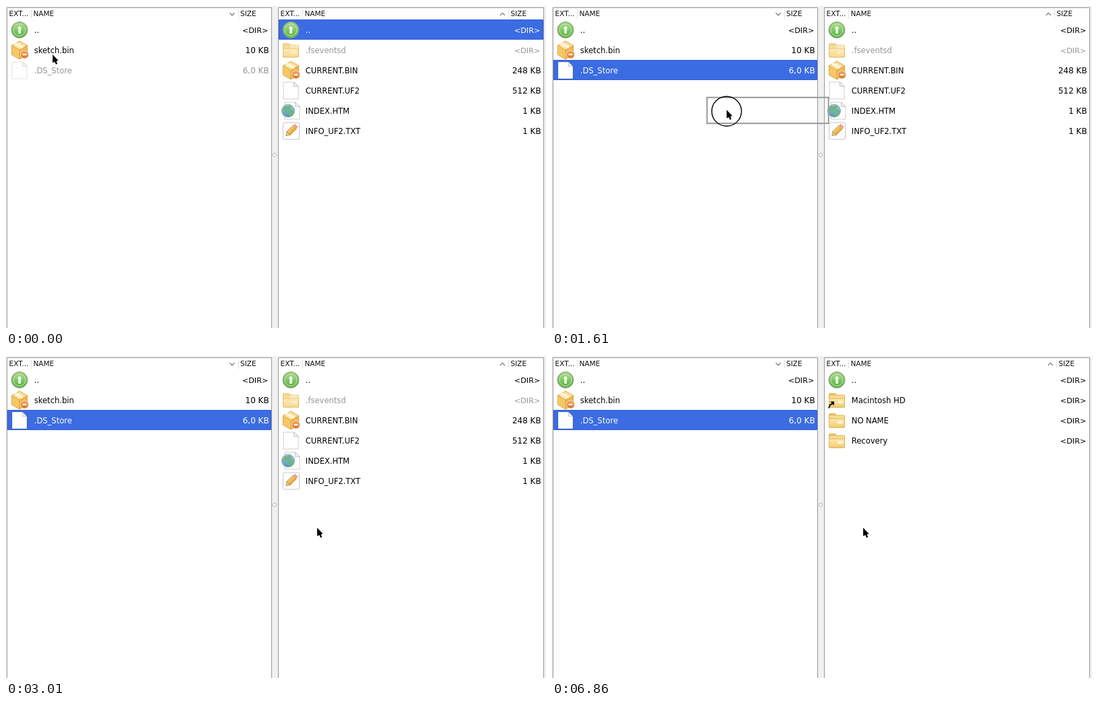
Animation, 800 px wide and 478 px high, one loop 7140 ms. Source, as an HTML page with a canvas:

```html
<!DOCTYPE html>
<html lang="de">
<head>
<meta charset="utf-8">
<title>Kopiere Dateien</title>
<style>
html, body { margin: 0; width: 100%; height: 100%; overflow: hidden; background: #f0f0f0; }
canvas { display: block; }
</style>
</head>
<body>
<canvas id="stage" width="800" height="478"></canvas>
<script>
const c = document.getElementById('stage').getContext('2d');
const LOOP = 7140, ROW = 30, HEAD = 20;
const PRESS = 280, DRAG = 1190, RELEASE = 1960, OPEN = 2400, CLOSE = 2800, COPIED = 3360, EJECTED = 6090;

const UP = ['up', '..', '<DIR>'];
const SKETCH = ['crate', 'sketch.bin', '10 KB'];
const FILES = [
  ['crate', 'CURRENT.BIN', '248 KB'], ['page', 'CURRENT.UF2', '512 KB'],
  ['web', 'INDEX.HTM', '1 KB'], ['note', 'INFO_UF2.TXT', '1 KB']
];
const LEFT = [UP, SKETCH, ['page', '.DS_Store', '6,0 KB', true]];
const BEFORE = [UP, ['folder', '.fseventsd', '<DIR>', true], ...FILES];
const AFTER = [UP, ...FILES, SKETCH];
const VOLUMES = [
  UP, ['link', 'Macintosh HD', '<DIR>'], ['folder', 'NO NAME', '<DIR>'], ['folder', 'Recovery', '<DIR>']
];

// Pointer stops: time, x, y.
const STOPS = [[70, 69, 72], [PRESS, 69, 64], [DRAG, 69, 64], [2030, 447, 244], [2310, 461, 255]];

const progress = (t, from, to) => Math.min(1, Math.max(0, (t - from) / (to - from)));
const smooth = p => p * p * (3 - 2 * p);
const mix = (a, b, p) => a + (b - a) * p;

function paint(fill, stroke, width = 1) {
  if (fill) { c.fillStyle = fill; c.fill(); }
  if (stroke) { c.strokeStyle = stroke; c.lineWidth = width; c.stroke(); }
}
function box(x, y, w, h, fill, stroke, radius = 0) {
  c.beginPath(); c.roundRect(x, y, w, h, radius); paint(fill, stroke);
}
function disc(x, y, r, fill, stroke, width) {
  c.beginPath(); c.arc(x, y, r, 0, 7); paint(fill, stroke, width);
}
function shape(points, fill, stroke, width) {
  c.beginPath();
  for (const [x, y] of points) c.lineTo(x, y);
  if (fill) c.closePath();
  paint(fill, stroke, width);
}
function text(s, x, y, size, color, align = 'left', family = '"DejaVu Sans", sans-serif') {
  c.font = `${size}px ${family}`; c.fillStyle = color; c.textAlign = align; c.fillText(s, x, y);
}
function at(x, y, drawing) {
  c.save(); c.translate(x, y); drawing(); c.restore();
}
function ramp(y, h, top, bottom) {
  const g = c.createLinearGradient(0, y, 0, y + h);
  g.addColorStop(0, top); g.addColorStop(1, bottom);
  return g;
}
function badge(r, top, bottom, sign) {
  disc(0, 0, r, ramp(-r, 2 * r, top, bottom), '#ffffff90');
  box(-r / 2, -1.1, r, 2.2, '#fff');
  if (sign === '+') box(-1.1, -r / 2, 2.2, r, '#fff');
}

// Icons are drawn around their own centre.
const icons = {
  up() {
    disc(0, 0, 12, ramp(-12, 24, '#a4ca86', '#62a44c'), '#86ad72');
    disc(0, 0, 9, ramp(-9, 18, '#a5dc89', '#58b83f'), '#cbe8b8');
    text('⬆', 0, 5.5, 15, '#fff', 'center');
  },
  crate() {
    const corner = k => [13.5 * Math.sin(k * Math.PI / 3), -13.5 * Math.cos(k * Math.PI / 3)];
    ['#fbe09a', '#eeb54f', '#f5c865'].forEach((color, face) => {
      const k = 2 * face - 1;
      shape([[0, 0], corner(k), corner(k + 1), corner(k + 2)], color, '#dfa94e');
    });
    shape([[-7, -10], [5, -4]], null, '#fff6dc', 4);
    at(7.5, 6.5, () => badge(6, '#f2a765', '#dc7225', '-'));
  },
  page() {
    const edge = '#00000030', fold = [[4.5, -12.5], [4.5, -6], [11, -6]];
    shape([[-11, -12.5], fold[0], fold[2], [11, 12.5], [-11, 12.5]], '#fefefe', edge);
    shape(fold, '#f1f1f1', edge);
  },
  web() {
    at(2, 0, icons.page);
    disc(-4, 0, 9.5, ramp(-10, 20, '#a5cedd', '#5494b4'), '#86a9b3');
    for (const [x, y, r] of [[-7, -3, 4], [0, 3, 4.5], [-2, -5, 3]]) disc(x, y, r, '#6fb588');
  },
  note() {
    box(-11.5, -12.5, 24, 25, '#fdfdfd', '#c6c6c6', 2);
    c.rotate(-Math.PI / 4);
    shape([[-10, 0], [-5, -3.5], [-5, 3.5]], '#f0d3a0', '#b89563');
    box(-5, -3.5, 13, 7, ramp(-3.5, 7, '#f9d277', '#e5a036'), '#cf9c4b');
    box(8, -3.5, 4, 7, '#e8a895', null, 1);
  },
  folder() {
    box(-11.5, -10, 10, 8, '#f3cd72', '#dfb158', 1);
    box(-11.5, -7.5, 23, 18, '#f8dd94', '#dfb158', 1);
    box(-11.5, -2.5, 23, 13, ramp(-3, 13, '#fdeab5', '#f4cd74'), '#dfb158', 1);
    box(1, 1, 8, 4, '#fff3cf');
  },
  link() {
    icons.folder();
    shape([[-12, 12], [-10, 7], [-6, 5]], null, '#111', 2);
    shape([[-10, 2], [-4, 2], [-4, 8]], '#111');
  }
};

function pane(x, w, rows, selected, ascending, sizeX) {
  box(x + 0.5, 2.5, w - 1, 480, '#fff', '#989898');
  at(x - 1, 0, () => {
    [['EXT...', 4.6], ['NAME', 40.5], ['SIZE', sizeX]].forEach(([label, left], i) => {
      text(label, left, 15, 10.5, '#111');
      if (i) box(Math.floor(left) - 3, 5, 1, 14, '#e2e2e2');
    });
    const tip = ascending ? -2 : 2, mid = sizeX - 12;
    shape([[mid - 3.5, 12 - tip], [mid, 12 + tip], [mid + 3.5, 12 - tip]], null, '#333');

    rows.forEach(([icon, name, size, hidden], i) => {
      const y = HEAD + ROW * i, on = i === selected, isDir = size === '<DIR>';
      const color = on ? '#fff' : hidden ? '#969696' : '#000';
      if (on) box(2.5, y + 0.5, w - 3, ROW - 1, '#3b6ce3', '#325fd0');
      at(20, y + 15.5, () => {
        if (hidden && !on) c.globalAlpha = 0.6;
        icons[icon]();
      });
      text(name, 41.8, y + 20, 11.5, color);
      text(size, w - (isDir ? 4.5 : 3.3), y + 20, isDir ? 11.3 : 12, color, 'right');
    });
  });
}

function dialog() {
  const x = 194, y = 43, w = 410, h = 351, bar = 23;
  at(0, 0, () => {
    c.shadowColor = 'rgba(0,0,0,.43)'; c.shadowBlur = 38; c.shadowOffsetY = 17;
    box(x, y, w, h, '#f4f4f4', null, 5);
  });
  box(x, y, w, bar, ramp(y, bar, '#ebebeb', '#d8d8d8'), null, [5, 5, 0, 0]);
  box(x, y + bar - 1, w, 1, '#c4c4c4');
  box(x - 0.5, y - 0.5, w + 1, h + 1, null, 'rgba(0,0,0,.2)', 5);
  ['#f4685e', '#dadada', '#dadada'].forEach((color, i) => disc(x + 14 + 20 * i, y + 11, 5.7, color, '#00000018'));
  text('Kopiere Dateien', x + w / 2, 59, 12.8, '#484848', 'center', 'Inter, sans-serif');
}

function pointer() {
  c.lineJoin = 'round';
  for (const [color, edge] of [['#fff', 1.6], ['#000', 0]]) {
    shape([[3.5, 8], [6, 14.2]], null, color, 2.4 + edge);
    shape([[0, 0], [0, 12.2], [8.4, 8.8]], color, edge && color, edge);
  }
}

function position(t) {
  const next = STOPS.findIndex(stop => stop[0] > t);
  if (next < 1) return STOPS.at(next).slice(1);
  const [from, to] = [STOPS[next - 1], STOPS[next]];
  const p = smooth(progress(t, from[0], to[0]));
  return [mix(from[1], to[1], p), mix(from[2], to[2], p)];
}

// The ring closes in on the press and opens out again on the release.
function ring(t, x, y) {
  if (t < PRESS || t >= OPEN) return;
  const press = progress(t, PRESS, 700), release = progress(t, RELEASE, OPEN);
  at(x, y + 2, () => {
    c.globalAlpha = Math.min(1, press * 2, 2 - release * 2);
    disc(0, 0, mix(128, 22, press) + 106 * release, null, '#000', 1.4);
  });
}

function draw(t) {
  const [x, y] = position(t);
  const pressed = t >= PRESS;
  const leftRow = !pressed ? -1 : y > HEAD + 2 * ROW ? 2 : 1;
  const rows = t < COPIED ? BEFORE : t < EJECTED ? AFTER : VOLUMES;
  const dragging = x > 76 && t < 2100;

  box(0, 0, 800, 478, '#f0f0f0');
  pane(1, 393, LEFT, leftRow, false, 347);
  pane(403, 394, rows, pressed ? -1 : 0, true, t < EJECTED ? 345.5 : 348.5);
  disc(398, 221, 2.7, '#f8f8f8', '#bcbcbc');

  if (dragging) at(x, y, () => {
    c.beginPath(); c.rect(-29, -18.5, 180, 38.5); paint(null, '#999', 2);
  });
  if (t >= OPEN && t < CLOSE) dialog();
  ring(t, x, y);
  at(x, y, pointer);
  if (dragging && x > 403) at(x + 9, y + 22, () => badge(9, '#5fbf4a', '#23851c', '+'));
}

function tick() {
  draw(performance.now() % LOOP);
  requestAnimationFrame(tick);
}
tick();
</script>
</body>
</html>
```
